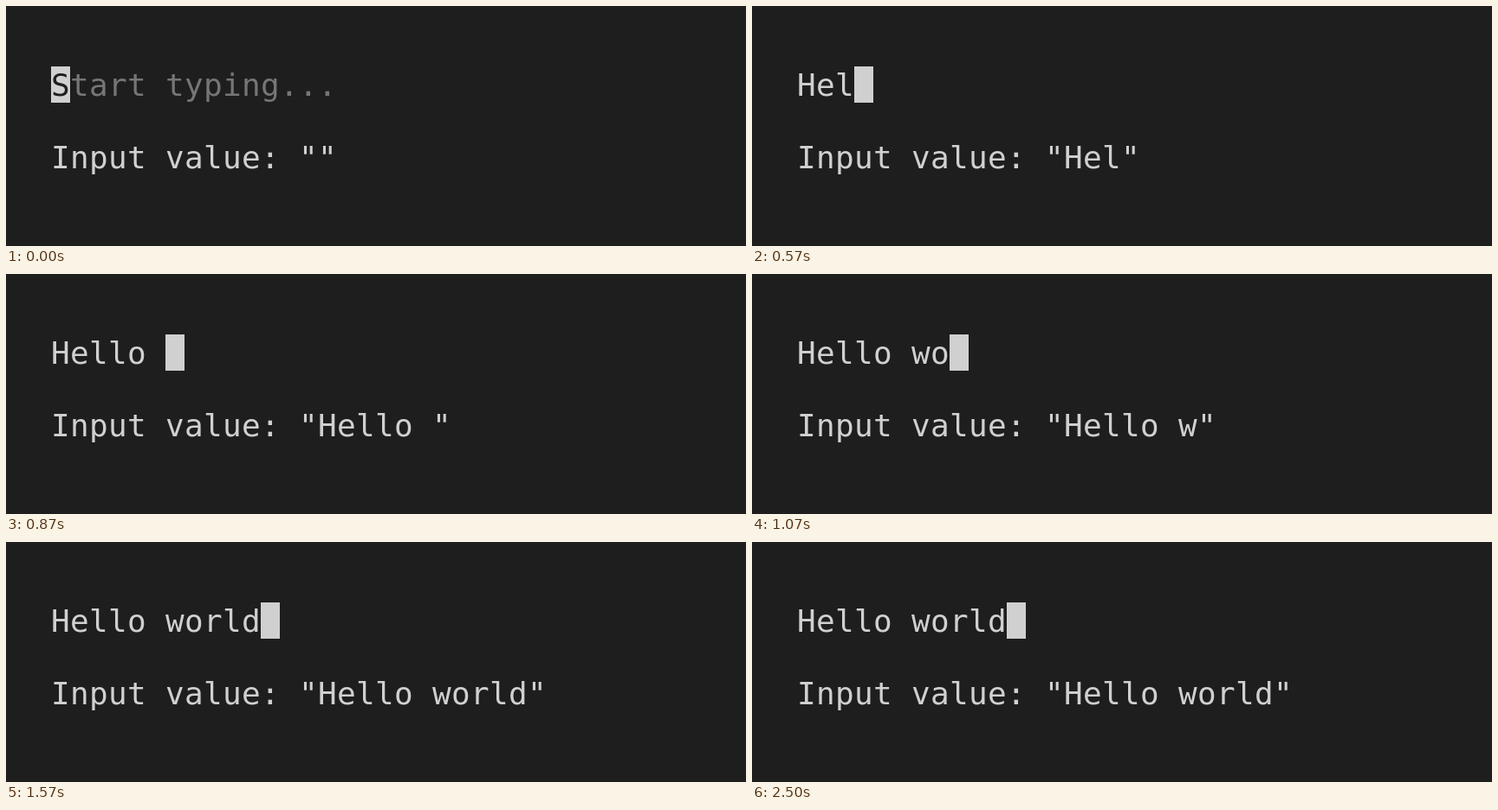
Recreate the animation shown at these times as an HTML page. Size 854 by 278 pixels, loop 2920 ms.

```html
<!DOCTYPE html>
<html lang="en">
<head>
<meta charset="utf-8">
<title>Text input</title>
<style>
  html, body { margin: 0; width: 100%; height: 100%; overflow: hidden; background: #1e1e1e; }
  svg { display: block; }
  text {
    font: 36px "DejaVu Sans Mono", monospace;
    letter-spacing: .328px;
    white-space: pre;
    fill: #d0d0d0;
  }
  #hint { fill: #767676; }
  #hint tspan { fill: #1e1e1e; }
</style>
</head>
<body>
<svg width="854" height="278" viewBox="0 0 854 278">
  <rect id="cursor" y="70" width="22" height="42" fill="#d0d0d0"/>
  <text id="hint" x="52" y="104"><tspan>S</tspan>tart typing...</text>
  <text id="typed" x="52" y="104"></text>
  <text id="value" x="52" y="188"></text>
</svg>
<script>
const LOOP = 2920, LEFT = 52, CELL = 22, TEXT = "Hello world";
// Times at which each character is typed, and later echoed in the value line
const typedAt = [430, 500, 530, 730, 800, 830, 1000, 1070, 1270, 1370, 1530];
const echoedAt = [470, 530, 570, 770, 830, 870, 1030, 1100, 1300, 1400, 1570];

const el = id => document.getElementById(id);
const [cursor, hint, typed, value] = ["cursor", "hint", "typed", "value"].map(el);
const shown = (times, t) => TEXT.slice(0, times.filter(at => at <= t).length);
const start = performance.now();

function draw(now) {
  const t = Math.max(0, now - start) % LOOP;
  const input = shown(typedAt, t);
  typed.textContent = input;
  value.textContent = `Input value: "${shown(echoedAt, t)}"`;
  hint.style.display = input ? "none" : "";
  cursor.setAttribute("x", LEFT + CELL * input.length);
  requestAnimationFrame(draw);
}
draw(start);
</script>
</body>
</html>
```
